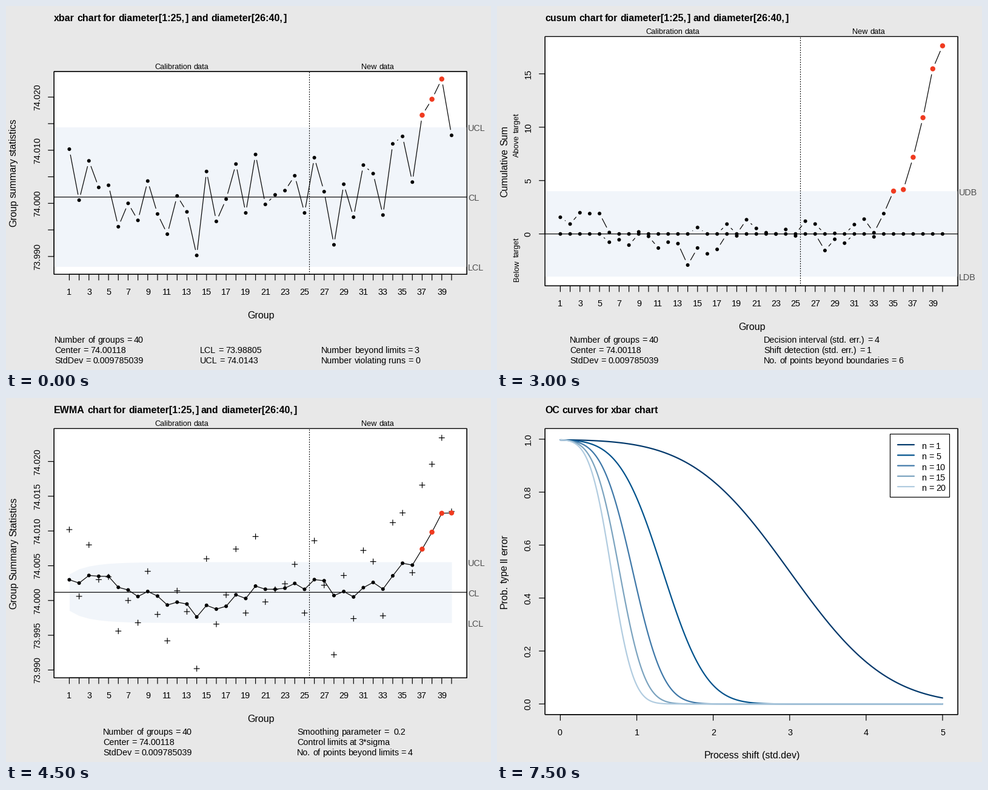
Animation, 800 px wide and 600 px high, one loop 8000 ms. Source, as a matplotlib script:

```python
import math

import numpy as np
import matplotlib.pyplot as plt
from matplotlib.animation import FuncAnimation
from matplotlib.collections import LineCollection, PatchCollection
from matplotlib.patches import Circle, Rectangle

PX = 0.72  # points per pixel at 100 dpi
plt.rcParams.update({
    "font.family": "Liberation Sans",
    "path.snap": False,
    "path.simplify": False,
    "lines.scale_dashes": False,
    "lines.solid_capstyle": "round",
    "lines.dash_capstyle": "round",
})

GRAY, RED, ORANGE = "#4d4d4d", "#f03b20", "#fd8d3c"
BANDS = ["#f1f5fa", "#e7ecf4", "#dce4ee"]
BLUES = ["#00386b", "#00528c", "#3f78a8", "#7ba3bf", "#b1cce0"]
DOTTED, DASHED = (0, (PX, 3 * PX)), (0, (4 * PX, 4 * PX))
STROKE = 1.2

# Group means in units of 0.0001 above 74
MEANS = 74 + 1e-4 * np.array([
    102, 6, 80, 30, 34, -44, 0, -32, 42, -20, -58, 14, -16, -98, 60,
    -34, 8, 74, -18, 92, -2, 16, 24, 52, -18, 86, 22, -78, 36, -26,
    72, 56, -22, 112, 126, 40, 166, 196, 234, 128])
GROUPS = np.arange(1, 41)
CENTER, SD = 74.00118, 0.009785039
SE = SD / math.sqrt(5)
LEFT, RIGHT, TOP = 79.22, 760.18, 50.42
BASICS = ["Number of groups = 40", "Center = 74.00118", "StdDev = 0.009785039"]

fig = plt.figure(figsize=(8, 6), dpi=100, facecolor="#e8e8e8")
ax = fig.add_axes([0, 0, 1, 1])
advances = {}


def measure(s, weight):
    probe = fig.text(0, 0, s, fontsize=1000 * PX, weight=weight)
    width = probe.get_window_extent().width / 1000
    probe.remove()
    return width


def advance(ch, weight):
    """Width of one character in em."""
    key = ch, weight
    if key not in advances:
        advances[key] = measure(f"|{ch}|", weight) - measure("||", weight)
    return advances[key]


def text(x, y, s, size=14.4, ha="left", weight="normal", rotation=0, **kw):
    """Place words on the pixel grid, with whole-pixel character advances."""
    steps = [round(size * advance(c, weight)) for c in s]
    offsets = np.cumsum([0] + steps)
    shift = offsets[-1] / 2 if ha == "center" else 0
    start = 0
    for word in s.split(" "):
        d = offsets[start] - shift if word else 0
        wx, wy = (x, y - d) if rotation else (x + d, y)
        if word:
            ax.text(round(wx), round(wy), word, fontsize=size * PX,
                    weight=weight, rotation=rotation, ha="left",
                    va="baseline", rotation_mode="anchor", **kw)
        start += len(word) + 1


def line(x, y, color="black", width=STROKE, **kw):
    ax.plot(x, y, color=color, lw=width * PX, **kw)


def rect(x0, y0, x1, y1, fill, edge="none", z=1):
    ax.add_patch(Rectangle((x0, y0), x1 - x0, y1 - y0, facecolor=fill,
                           edgecolor=edge, lw=STROKE * PX, zorder=z))


def dots(xs, ys, r=3, color="black"):
    ax.add_collection(PatchCollection([Circle(p, r) for p in zip(xs, ys)],
                                      facecolor=color, edgecolor="none", zorder=4))


def stats(columns, first=555):
    for x, rows in columns:
        for k, s in enumerate(rows):
            text(x, first + 17.2 * k, s)


class Panel:
    """Framed plot region that maps data to pixels."""

    def __init__(self, top, bottom, xlim, ylim, left=LEFT, right=RIGHT):
        self.box = left, top, right, bottom
        self.xlim, self.ylim = xlim, ylim
        rect(*self.box, "white", "black")
        rect(*self.box, "none", "black", z=3)

    def x(self, v):
        a, b = self.xlim
        w = self.box[2] - self.box[0]
        return self.box[0] + w * (0.04 + (np.asarray(v) - a) / (b - a)) / 1.08

    def y(self, v):
        a, b = self.ylim
        h = self.box[3] - self.box[1]
        return self.box[3] - h * (0.04 + (np.asarray(v) - a) / (b - a)) / 1.08

    def xaxis(self, ticks, labels, drop=34):
        xs, base = self.x(ticks), self.box[3]
        line([xs[0], xs[-1]], [base, base])
        for x, s in zip(xs, labels):
            line([x, x], [base, base + 9.6])
            text(x, base + drop, s, ha="center")

    def yaxis(self, ticks, labels):
        ys, base = self.y(ticks), self.box[0]
        line([base, base], [ys[0], ys[-1]])
        for y, s in zip(ys, labels):
            line([base, base - 9.6], [y, y])
            text(56, y, s, ha="center", rotation=90)

    def ylabel(self, s):
        text(17, (self.box[1] + self.box[3]) / 2, s, 16, "center", rotation=90)

    def hline(self, v):
        line(self.box[::2], [self.y(v)] * 2)

    def vline(self, x, style):
        line([x, x], [self.box[3], self.box[1]], ls=style)

    def band(self, lo, hi, color):
        rect(self.box[0], self.y(hi), self.box[2], self.y(lo), color)

    def side(self, v, s):
        text(762, self.y(v) + 6.4, s, color=GRAY)


def control_panel(name, top, bottom, ylim, ylabel):
    """Panel with the group axis and the split between both data sets."""
    p = Panel(top, bottom, (1, 40), ylim)
    text(LEFT, 25, f"{name} chart for diameter[1:25, ] and diameter[26:40, ]",
         16, weight="bold")
    text(290, top - 4.2, "Calibration data", 12.8, "center")
    text(613, top - 4.2, "New data", 12.8, "center")
    p.xaxis(GROUPS, [str(g) if g % 2 else "" for g in GROUPS])
    text((LEFT + RIGHT) / 2, bottom + 72.7, "Group", 16, "center")
    p.ylabel(ylabel)
    p.vline(p.x(25.5), DOTTED)
    return p


def broken_line(xs, ys, gap=9.6):
    """Segments that stop short of each point."""
    pts = np.column_stack([xs, ys])
    segs = []
    for a, b in zip(pts[:-1], pts[1:]):
        f = gap / np.hypot(*(b - a))
        if f < 0.5:
            segs.append([a + f * (b - a), b - f * (b - a)])
    ax.add_collection(LineCollection(segs, colors="black", capstyle="round",
                                     linewidths=STROKE * PX, zorder=2))


def marked(xs, ys, bad):
    dots(xs[~bad], ys[~bad])
    dots(xs[bad], ys[bad], 4.2, RED)


def xbar(zones):
    lcl, ucl = CENTER - 3 * SE, CENTER + 3 * SE
    p = control_panel("xbar", 108, 442.3, (lcl, MEANS.max()),
                      "Group summary statistics")
    for k, color in zip((3, 2, 1), BANDS if zones else BANDS[:1]):
        p.band(CENTER - k * SE, CENTER + k * SE, color)
    p.yaxis(73.99 + 0.005 * np.arange(7),
            ["73.990", "", "74.000", "", "74.010", "", "74.020"])
    p.hline(CENTER)
    xs, ys = p.x(GROUPS), p.y(MEANS)
    broken_line(xs, ys)
    runs = np.isin(GROUPS, [35, 40]) & zones
    marked(xs[~runs], ys[~runs], MEANS[~runs] > ucl)
    for x, y in zip(xs[runs], ys[runs]):
        rect(x - 3.8, y - 3.8, x + 3.8, y + 3.8, ORANGE, z=4)
    for v, s in ((lcl, "LCL"), (CENTER, "CL"), (ucl, "UCL")):
        p.side(v, s)
    stats([(80, BASICS),
           (320, ["", "LCL = 73.98805", "UCL = 74.0143"]),
           (520, ["", "Number beyond limits = 3",
                  f"Number violating runs = {runs.sum()}"])])


def cusum():
    up, down = [0], [0]
    for z in (MEANS - CENTER) / SE:
        up.append(max(0, up[-1] + z - 0.5))
        down.append(min(0, down[-1] + z + 0.5))
    up, down = np.array(up[1:]), np.array(down[1:])
    p = control_panel("cusum", TOP, 461.3, (-4, up.max()), "Cumulative Sum")
    p.band(-4, 4, BANDS[0])
    p.yaxis([0, 5, 10, 15], ["0", "5", "10", "15"])
    text(36.4, 212.5, "Above target", 12.8, "center", rotation=90)
    text(36.4, 417.5, "Below target", 12.8, "center", rotation=90)
    p.hline(0)
    xs = p.x(GROUPS)
    for s in (up, down):
        broken_line(xs, p.y(s))
        marked(xs, p.y(s), s > 4)
    p.side(4, "UDB")
    p.side(-4, "LDB")
    stats([(120, BASICS),
           (440, ["Decision interval (std. err.) = 4",
                  "Shift detection (std. err.) = 1",
                  "No. of points beyond boundaries = 6"])])


def ewma():
    lam, level, smooth = 0.2, CENTER, []
    for m in MEANS:
        level += lam * (m - level)
        smooth.append(level)
    smooth = np.array(smooth)
    half = 3 * SE * np.sqrt(lam / (2 - lam) * (1 - (1 - lam) ** (2 * GROUPS)))
    p = control_panel("EWMA", TOP, 461.3, (MEANS.min(), MEANS.max()),
                      "Group Summary Statistics")
    xs, ys = p.x(GROUPS), p.y(smooth)
    ax.fill_between(xs, p.y(CENTER - half), p.y(CENTER + half),
                    color=BANDS[0], lw=0, zorder=1)
    ticks = 73.99 + 0.005 * np.arange(7)
    p.yaxis(ticks, [f"{t:.3f}" for t in ticks])
    p.hline(CENTER)
    for x, y in zip(xs, p.y(MEANS)):
        line([x - 4.5, x + 4.5], [y, y])
        line([x, x], [y - 4.5, y + 4.5])
    line(xs, ys)
    marked(xs, ys, smooth > CENTER + half)
    for v, s in ((CENTER - SE, "LCL"), (CENTER, "CL"), (CENTER + SE, "UCL")):
        p.side(v, s)
    stats([(160, BASICS),
           (480, ["Smoothing parameter =  0.2", "Control limits at 3*sigma",
                  "No. of points beyond limits = 4"])])


def capability():
    peak = 1 / (SD * math.sqrt(2 * math.pi))
    p = Panel(TOP, 427.2, (73.94, 74.06), (0, 1.05 * peak), left=40.82)
    text(40, 25, "Process capability analysis", 16, weight="bold")
    for k, n in enumerate([1, 0, 18, 42, 44, 17, 3]):
        a = 73.96 + 0.01 * k
        if n:
            rect(p.x(a), p.y(n / 1.25), p.x(a + 0.01), p.y(0), "#c1d0e0", "white")
    v = np.linspace(73.94, 74.06, 400)
    line(p.x(v), p.y(peak * np.exp(-0.5 * ((v - CENTER) / SD) ** 2)))
    for at, s, style in ((73.95, "LSL", DOTTED), (74, "Target", DASHED),
                         (74.05, "USL", DOTTED)):
        p.vline(p.x(at), style)
        text(p.x(at) - 0.5, 46, s, ha="center", color=GRAY)
    ticks = 73.94 + 0.02 * np.arange(7)
    p.xaxis(ticks, [f"{t:.2f}" for t in ticks], 30)
    text(400, 482, "diameter[1:25, ]", 16, "center")
    stats([(56, ["Number of obs = 125"] + BASICS[1:]),
           (280, ["Target = 74", "LSL = 73.95", "USL = 74.05"]),
           (448, ["Cp     = 1.7", "Cp_l  = 1.74", "Cp_u = 1.66",
                  "Cp_k = 1.66", "Cpm  = 1.69"]),
           (600, ["Exp<LSL 0%", "Exp>USL 0%", "Obs<LSL 0%", "Obs>USL 0%"])],
          520.4)


def phi(z):
    return np.array([0.5 * (1 + math.erf(t / math.sqrt(2))) for t in z])


def oc_curves():
    p = Panel(TOP, 521.8, (0, 5), (0, 1))
    text(LEFT, 25, "OC curves for xbar chart", 16, weight="bold")
    p.xaxis(range(6), "012345")
    ticks = np.arange(6) / 5
    p.yaxis(ticks, [f"{t:.1f}" for t in ticks])
    p.ylabel("Prob. type II error")
    text((LEFT + RIGHT) / 2, 594, "Process shift (std.dev)", 16, "center")
    rect(648.5, 59.5, 746.5, 163.5, "white", "black")
    shift = np.linspace(0, 5, 300)
    for k, (n, color) in enumerate(zip((1, 5, 10, 15, 20), BLUES)):
        d = shift * math.sqrt(n)
        line(p.x(shift), p.y(phi(3 - d) - phi(-3 - d)), color, 2.2)
        y = 77 + 17.28 * k
        line([661, 688], [y, y], color, 2.2)
        text(700, y + 7, f"n = {n}")


SCENES = [lambda: xbar(False), lambda: xbar(True), cusum, ewma,
          capability, oc_curves]


def draw(i):
    ax.clear()
    ax.set_xlim(0, 800)
    ax.set_ylim(600, 0)
    ax.axis("off")
    SCENES[i // 3]()
    return []


anim = FuncAnimation(fig, draw, frames=16, interval=500, init_func=lambda: [],
                     repeat=True, repeat_delay=0, blit=False)
plt.show()
```
